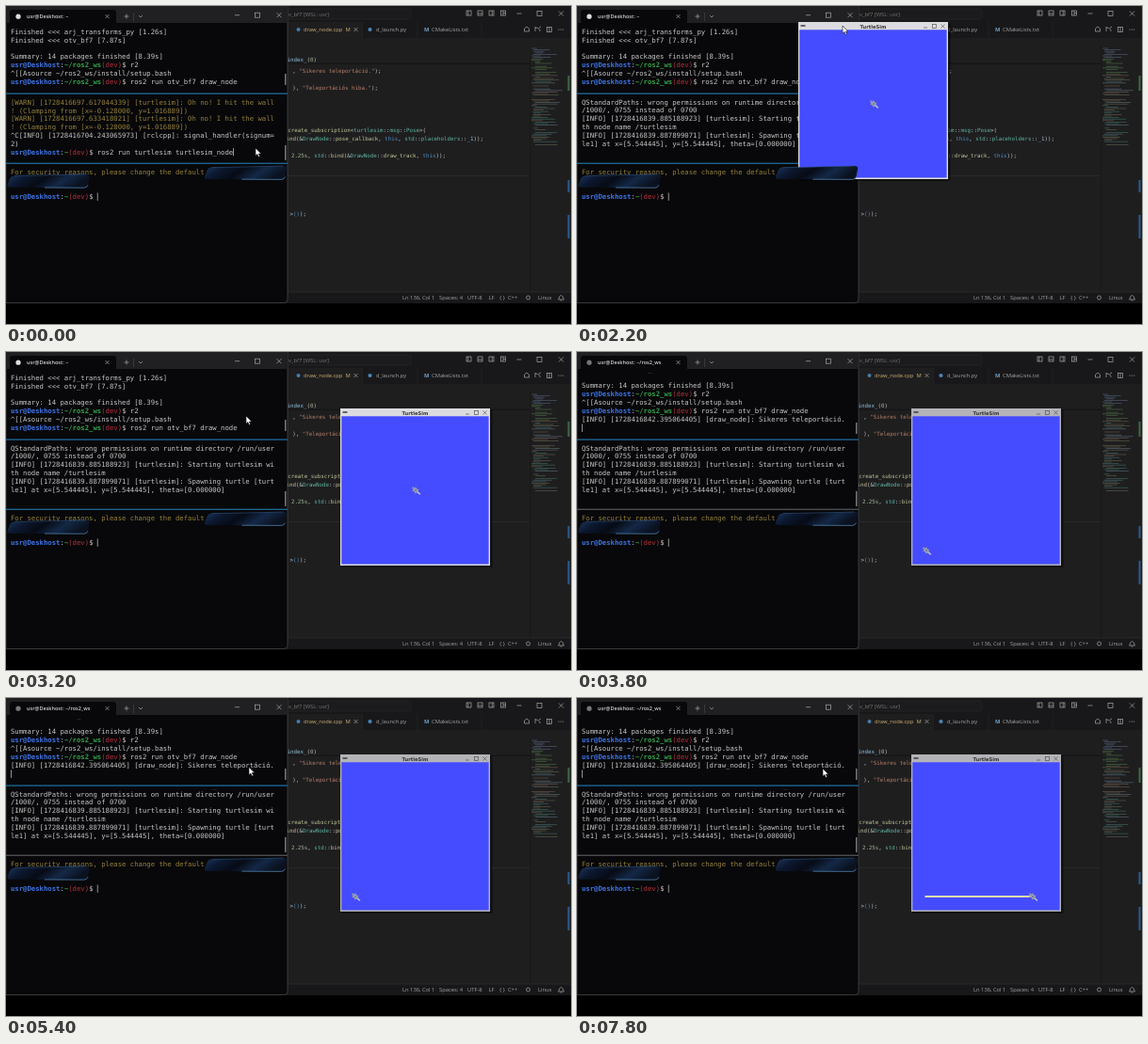
Recreate the animation shown at these times as an HTML page. Size 600 px wide and 338 px high, loop 8 s.

```html
<!DOCTYPE html>
<html lang="en">
<head>
<meta charset="utf-8">
<title>Turtle drawing demo</title>
<style>
  html, body { margin: 0; width: 100%; height: 100%; overflow: hidden; background: #000; }
  svg { display: block; width: 100%; height: 100%; }
  text { white-space: pre; }
  .mono { font: 7.27px "DejaVu Sans Mono", monospace; }
  .code { font: 5.8px "DejaVu Sans Mono", monospace; }
  .ui { font: 5.8px "Open Sans", "Noto Sans", sans-serif; fill: #a4a4a4; }
  .line { fill: none; stroke: #a8a8a8; stroke-width: .7; }
  .caret { fill: #b4b4b4; }
</style>
</head>
<body>
<svg viewBox="0 0 600 338" xmlns="http://www.w3.org/2000/svg">
  <defs>
    <clipPath id="topClip"><rect x="0" y="22.5" width="295" height="63"/></clipPath>
    <clipPath id="midClip"><rect x="0" y="97.5" width="295" height="62.5"/></clipPath>
    <linearGradient id="glow" x2="1" y2=".25">
      <stop offset="0" stop-color="#1d3a63"/>
      <stop offset=".25" stop-color="#0c1830"/>
      <stop offset=".5" stop-color="#070b16"/>
      <stop offset=".75" stop-color="#142846"/>
      <stop offset="1" stop-color="#0a1220"/>
    </linearGradient>
    <g id="cover">
      <path d="M8 1.6Q40 1.2 84 0Q88 0 87.6 3L86 11.5Q85.4 14.4 82 14.4L3 14Q0 14 .6 11L3 5Q4.4 1.6 8 1.6Z" fill="url(#glow)"/>
      <path d="M8 1.6Q40 1.2 84 0" fill="none" stroke="#2f5580" stroke-width=".6"/>
      <path d="M40 14.2L82 14.4Q85 14.2 86 11.5" fill="none" stroke="#5b8fbd" stroke-width=".7"/>
    </g>
    <g id="controls" class="line">
      <path d="M-2.5 0h5M42 -2.5l5 5m0 -5l-5 5"/>
      <rect x="19" y="-2.5" width="5" height="5"/>
    </g>
  </defs>

  <!-- Editor -->
  <rect width="600" height="316" fill="#1e1e1f"/>
  <rect width="600" height="34" fill="#18181a"/>
  <rect x="290" y="3" width="140" height="11" rx="2.5" fill="#1b1b1d" stroke="#29292b" stroke-width=".6"/>
  <text class="ui" x="300" y="10.6" style="fill:#777">v_bf7 [WSL: usr]</text>
  <g class="line">
    <rect x="489" y="5" width="5" height="5"/><path d="M490.8 5v5"/>
    <rect x="501" y="5" width="5" height="5"/><path d="M501 8h5"/>
    <rect x="513" y="5" width="5" height="5"/><path d="M516.2 5v5"/>
    <rect x="525.5" y="5" width="5" height="5"/><path d="M528 5v5m0 -2.5h2.5"/>
  </g>
  <use href="#controls" x="545" y="8"/>
  <rect x="299" y="17" width="79" height="17" fill="#1e1e1f"/>
  <path d="M378.5 17v17M437 17v17M505 17v17" stroke="#262628" stroke-width=".7"/>
  <circle cx="310.5" cy="25" r="2" fill="#4a7ba8"/>
  <text class="ui" x="316" y="27" style="fill:#cfae72">draw_node.cpp  M</text>
  <path class="line" d="M369.5 23l4 4m0 -4l-4 4"/>
  <circle cx="386.5" cy="25" r="2.1" fill="#4a86b8"/>
  <text class="ui" x="393" y="27">d_launch.py</text>
  <text class="ui" x="444" y="27" style="fill:#6d9fc4;font-weight:700">M</text>
  <text class="ui" x="452" y="27">CMakeLists.txt</text>
  <g class="line">
    <path d="M550.5 27v-3l2.5 -2l2.5 2v3zM562 22v5m0 -4q5 0 5 4m-1 -4l2 -1"/>
    <rect x="574.5" y="22.5" width="5" height="5"/><path d="M577 22.5v5"/>
  </g>
  <g fill="#a8a8a8"><circle cx="587" cy="25" r=".6"/><circle cx="589.3" cy="25" r=".6"/><circle cx="591.6" cy="25" r=".6"/></g>
  <path d="M299 61.3h258" stroke="#131314" stroke-width="1"/>
  <path d="M299 180.6h257" stroke="#2e2e30" stroke-width=".8"/>
  <g id="code"></g>
  <g id="minimap"></g>
  <rect x="299" y="304" width="301" height="12" fill="#18181a"/>
  <path d="M299 304h301" stroke="#2b2b2b" stroke-width=".7"/>
  <g id="status"></g>
  <circle cx="554.5" cy="310" r="2" class="line"/>
  <path class="line" d="M586.5 312q1 -1 1 -3q2 -3 4 0q0 2 1 3zM588.7 313h1.6"/>

  <!-- Terminal -->
  <path d="M0 0H299V312Q299 315.5 295 315.5H0Z" fill="#08080a" stroke="#444447" stroke-width=".8"/>
  <rect width="298.6" height="18" fill="#202023"/>
  <path d="M4 18V7Q4 4 7 4H114Q117 4 117 7V18Z" fill="#08080a"/>
  <circle id="tabIcon" cx="13" cy="11.2" r="2.6"/>
  <text id="tabTitle" class="ui" x="22" y="13.4" style="font-size:5.5px;font-weight:600;fill:#d4d4d4"></text>
  <path class="line" d="M105.5 9l4 4m0 -4l-4 4M125.5 11h5m-2.5 -2.5v5M141 10l2 2l2 -2"/>
  <path d="M135.5 7v9" stroke="#444" stroke-width=".7"/>
  <use href="#controls" x="245.5" y="9.7"/>
  <g clip-path="url(#topClip)"><g id="topLog"></g></g>
  <g clip-path="url(#midClip)"><g id="midLog"></g></g>
  <g id="bottomLog"></g>
  <rect x="0" y="92.4" width="299" height="1.4" fill="#1d628f"/>
  <rect id="lowerRule" x="0" y="166.6" width="299" height="1.4"/>
  <g fill="#969696">
    <rect id="topThumb" x="296.2" width="1.2" height="12"/>
    <rect x="296.2" y="148" width="1.2" height="16"/>
  </g>
  <rect id="topCaret" class="caret" x="5" y="76.5" width=".8" height="8.4"/>
  <rect id="midCaret" class="caret" y="151" width=".8" height="8.4"/>
  <rect class="caret" x="96.8" y="198.5" width=".8" height="8.4"/>

  <!-- Simulator window -->
  <g id="sim">
    <rect x="1" y="1.5" width="160.5" height="167.5" fill="#000" opacity=".45"/>
    <rect id="simFrame" width="159" height="167"/>
    <text x="79.5" y="6.7" text-anchor="middle" style="font:bold 5.2px 'DejaVu Sans',sans-serif" fill="#333">TurtleSim</text>
    <path d="M2.5 4h5" stroke="#333" stroke-width="1.4"/>
    <g fill="none" stroke="#555" stroke-width=".7">
      <path d="M133 6h4M151.5 2.5l4 4m0 -4l-4 4"/><rect x="142.5" y="2.5" width="4" height="4"/>
    </g>
    <rect x="1.3" y="8.3" width="156.3" height="157.2" fill="#454cff"/>
    <path id="trail" fill="none" stroke="#dde0ae" stroke-width="2"/>
    <g id="turtle">
      <g transform="rotate(42)">
        <path d="M-2.5 -3l4.5 6m0 -6l-4.5 6" stroke="#8288a8" stroke-width="1"/>
        <path d="M2 0h4.5" stroke="#b4bcc8" stroke-width="1.6"/>
        <ellipse rx="3" ry="2.1" fill="#a2a9b4"/>
        <path d="M-2 0h4M0 -1.6v3.2" stroke="#5d6590" stroke-width=".6"/>
        <circle cx="-3.8" r="1" fill="#9aa0a8"/>
      </g>
    </g>
  </g>
  <use href="#cover" x="1" y="178.8"/>
  <use href="#cover" x="210.5" y="170"/>
  <path id="pointer" d="M0 0V8.2L1.9 6.5L3.2 9.4L4.6 8.8L3.3 6H5.9Z" fill="#fff" stroke="#111" stroke-width=".6"/>
</svg>
<script>
const LOOP = 8000, TICK = 200, ROW = 8.9;
const NS = "http://www.w3.org/2000/svg";
const $ = id => document.getElementById(id);
const set = (id, attrs) => { for (const k in attrs) $(id).setAttribute(k, attrs[k]); };
const show = (id, on) => set(id, { visibility: on ? "visible" : "hidden" });
const move = (id, [x, y]) => set(id, { transform: `translate(${x} ${y})` });

function add(parent, tag, attrs, content = "") {
  const node = document.createElementNS(NS, tag);
  for (const k in attrs) node.setAttribute(k, attrs[k]);
  node.textContent = content;
  parent.append(node);
  return node;
}

// Each chunk between "¦" marks starts with its colour key.
const colors = {
  w: "#c6c6c6", y: "#94803a", u: "#3d74e6", g: "#34a04a", r: "#b5303c",
  s: "#b9806a", v: "#8fbfdc", f: "#c4c49a", t: "#5fb5a2", k: "#4f8fc4", n: "#a5b899"
};
const bold = "ug";
function write(parent, attrs, markup) {
  const line = add(parent, "text", attrs);
  for (const part of markup.split("¦")) {
    const key = part[0];
    add(line, "tspan", { fill: colors[key], "font-weight": bold.includes(key) ? 700 : 400 }, part.slice(1));
  }
}
const writeLog = (id, y, lines) => lines.forEach((markup, i) =>
  write($(id), { class: "mono", x: 5, y: y + i * ROW + 2.6 }, markup));
const prompt = (path, command = "") =>
  `uusr@Deskhost¦w:¦g${path}¦r(dev)¦w$ ${command}`;

writeLog("topLog", 27, [
  "wFinished <<< arj_transforms_py [1.26s]",
  "wFinished <<< otv_bf7 [7.87s]",
  "w",
  "wSummary: 14 packages finished [8.39s]",
  prompt("~/ros2_ws", "r2"),
  "w^[[Asource ~/ros2_ws/install/setup.bash",
  prompt("~/ros2_ws", "ros2 run otv_bf7 draw_node"),
  "w[INFO] [1728416842.395064405] [draw_node]: Sikeres teleportáció."
]);
writeLog("midLog", 102, [
  "y[WARN] [1728416697.617044339] [turtlesim]: Oh no! I hit the wall",
  "y! (Clamping from [x=-0.128000, y=1.016889])",
  "y[WARN] [1728416697.633418021] [turtlesim]: Oh no! I hit the wall",
  "y! (Clamping from [x=-0.128000, y=1.016889])",
  "w^C[INFO] [1728416704.243065973] [rclcpp]: signal_handler(signum=",
  "w2)",
  prompt("~", "ros2 run turtlesim turtlesim_node"),
  "wQStandardPaths: wrong permissions on runtime directory /run/user",
  "w/1000/, 0755 instead of 0700",
  "w[INFO] [1728416839.885188923] [turtlesim]: Starting turtlesim wi",
  "wth node name /turtlesim",
  "w[INFO] [1728416839.887899071] [turtlesim]: Spawning turtle [turt",
  "wle1] at x=[5.544445], y=[5.544445], theta=[0.000000]"
]);
writeLog("bottomLog", 176, [
  "yFor security reasons, please change the default", "w", "w", prompt("~")
]);

// Code lines are set by their right edge; the terminal hides their start.
[
  [330, 57, "vindex_¦w(¦n0¦w)"],
  [398.5, 69, "w, ¦s\"Sikeres teleportáció.\"¦w);"],
  [395, 87, "w), ¦s\"Teleportációs hiba.\"¦w);"],
  [446, 132, "fcreate_subscription¦w<¦tturtlesim¦w::¦tmsg¦w::¦tPose¦w>("],
  [507, 141, "fbind¦w(&¦tDrawNode¦w::¦fpose_callback¦w, ¦kthis¦w, ¦tstd¦w::¦tplaceholders¦w::¦v_1¦w));"],
  [467, 159, "n2.25s¦w, ¦tstd¦w::¦fbind¦w(&¦tDrawNode¦w::¦fdraw_track¦w, ¦kthis¦w));"],
  [319, 221, "w>¦k()¦w);"]
].forEach(([x, y, markup]) =>
  write($("code"), { class: "code", x, y: y + 2, "text-anchor": "end" }, markup));

[[421, "Ln 136, Col 1"], [460, "Spaces: 4"], [490, "UTF-8"], [512.5, "LF"],
 [524, "{ }  C++"], [565, "Linux"]].forEach(([x, label]) =>
  add($("status"), "text", { class: "ui", x, y: 312 }, label));

function drawMinimap() {
  let seed = 11;
  const random = () => (seed = seed * 16807 % 2147483647) / 2147483647;
  const map = $("minimap");
  add(map, "rect", { x: 556.5, y: 43, width: .7, height: 261, fill: "#141415" });
  for (let y = 43; y < 150; y += 1.6) {
    if (random() < .17) continue;
    const fill = y < 55 ? "#66789a" : y < 72 ? "#5f8a52" : ["#6d8799", "#4a8577", "#8b6d5c", "#77775f"][random() * 4 | 0];
    const x = 558 + (random() * 3 | 0) * 2;
    add(map, "rect", { x, y, width: 5 + random() * 24, height: .8, fill, opacity: .55 });
  }
  const mark = (y, height, fill) => add(map, "rect", { x: 596.5, y, width: 2, height, fill });
  mark(74, 16, "#3f6a45");
  mark(185, 13, "#2c5d8f");
  mark(222, 25, "#2c5d8f");
}
drawMinimap();

// Linear path through [time, x, y] points.
function along(points, t) {
  const i = points.findIndex(p => p[0] > t);
  if (i < 0) return points.at(-1).slice(1);
  if (!i) return points[0].slice(1);
  const [a, b] = [points[i - 1], points[i]];
  const k = (t - a[0]) / (b[0] - a[0]);
  return [1, 2].map(n => a[n] + (b[n] - a[n]) * k);
}
const simPath = [[2200, 235, 17], [3000, 355, 60]];
const pointerPath = [[1400, 265, 151], [2000, 282, 21], [2200, 282, 21], [3000, 402, 64],
  [3200, 255, 68], [3400, 255, 72], [5200, 255, 72], [5600, 261, 75]];
const turtlePath = [[3799, 80, 87], [3800, 16, 151], [6600, 16, 151], [7800, 129, 151]];

function render(t) {
  const simOpen = t >= 1400, topFocused = t >= 3400, logged = t >= 3800;
  const midRows = t < 600 ? 0 : t < 800 ? 1 : t < 1000 ? 2 : simOpen ? 7 : 4;
  move("topLog", [0, logged ? -2 * ROW : 0]);
  move("midLog", [0, -midRows * ROW]);
  set("midCaret", { x: midRows ? 5 : 241.2 });
  show("midCaret", !simOpen);
  show("topCaret", logged);
  set("topThumb", { y: logged ? 75 : 72 });
  set("lowerRule", { fill: topFocused ? "#4a4d52" : "#1d628f" });
  $("tabTitle").textContent = "usr@Deskhost: ~" + (topFocused ? "/ros2_ws" : "");
  set("tabIcon", { fill: topFocused ? "#777" : "#ddd" });

  show("sim", simOpen);
  move("sim", along(simPath, t));
  set("simFrame", { fill: topFocused ? "#b4b4b8" : "#dcdce0" });
  const [x, y] = along(turtlePath, t);
  move("turtle", [x, y]);
  set("trail", { d: t > 6600 ? `M14.5 ${y}H${x}` : "" });

  show("pointer", t < 600 || (simOpen && t < 3600) || t >= 5200);
  move("pointer", along(pointerPath, t));
}

function frame() {
  render(Math.floor(performance.now() % LOOP / TICK) * TICK);
  requestAnimationFrame(frame);
}
frame();
</script>
</body>
</html>
```
